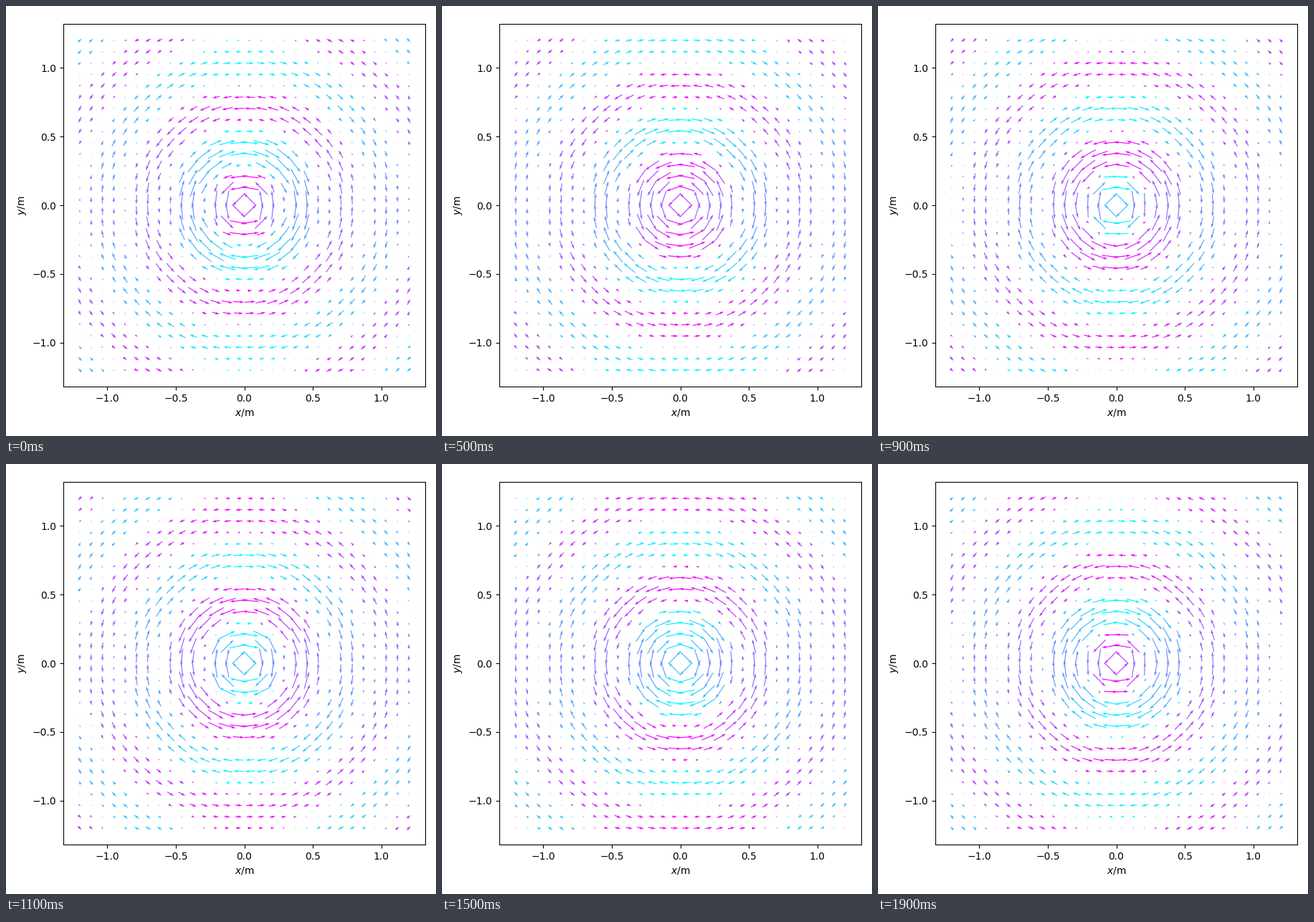
Write a matplotlib script that moves like this. It is 600x600 px and loops after 2000 ms.

```python
import numpy as np
import matplotlib.pyplot as plt
from matplotlib.animation import FuncAnimation

FRAMES, INTERVAL = 20, 100   # one period, ms per frame
WAVELENGTH = 0.6             # m
CAP = 20                     # longest arrow drawn near the dipole

k = 2 * np.pi / WAVELENGTH
grid = np.linspace(-1.2, 1.2, 30)
step = grid[1] - grid[0]
X, Y = np.meshgrid(grid, grid)
R = np.hypot(X, Y)


def field(i):
    """Curl of the retarded dipole potential, with the arrow colours."""
    potential = np.cos(k * R - 2 * np.pi * i / FRAMES) / R
    dy, dx = np.gradient(potential, step)
    u, v = dy, -dx
    size = np.hypot(u, v)
    limit = np.minimum(1, CAP / np.maximum(size, 1e-12))
    # cyan for clockwise, magenta for anticlockwise, fading to the sides
    hue = -np.arctan2(u * np.sign(Y), np.abs(v)) / (np.pi / 2)
    return u * limit, v * limit, hue


fig = plt.figure(figsize=(6, 6), dpi=100)
ax = fig.add_axes([80 / 600, 69 / 600, 505 / 600, 506 / 600])
arrows = ax.quiver(X, Y, *field(0), pivot='mid', cmap='cool', clim=(-1, 1))
ax.set_xlim(-1.32, 1.32)
ax.set_ylim(-1.32, 1.32)
ticks = np.arange(-1, 1.1, 0.5)
ax.set_xticks(ticks)
ax.set_yticks(ticks)
ax.set_xlabel('$x$/m')
ax.set_ylabel('$y$/m')


def update(i):
    arrows.set_UVC(*field(i))
    return arrows,


anim = FuncAnimation(fig, update, frames=FRAMES, interval=INTERVAL,
                     repeat=True, repeat_delay=0)
plt.show()
```
